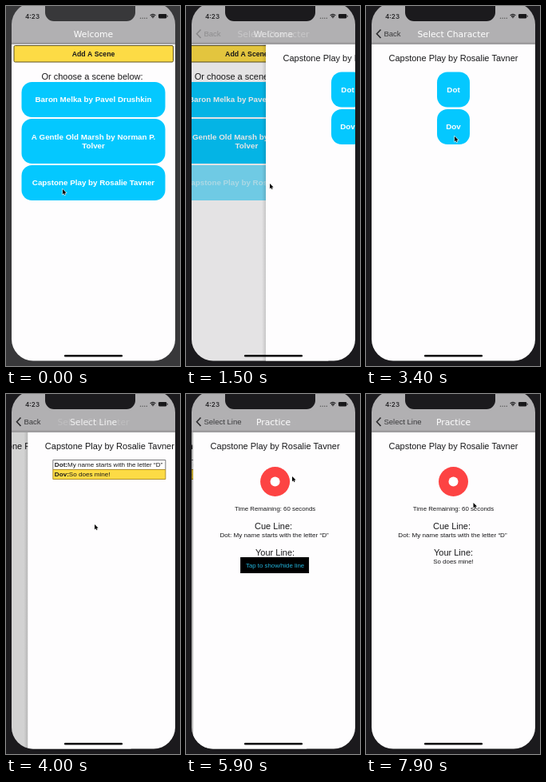
Animation, 218 px wide and 450 px high, one loop 8000 ms. Source, as an HTML page with a canvas:

```html
<!DOCTYPE html>
<html lang="en">
<head>
<meta charset="utf-8">
<title>Scene practice app</title>
<style>
  html, body { margin: 0; width: 100%; height: 100%; overflow: hidden; background: #1b1a1d; }
  canvas { display: block; }
</style>
</head>
<body>
<canvas id="stage" width="218" height="450"></canvas>
<script>
const g = document.getElementById('stage').getContext('2d');
const LOOP = 8000, STEP = 100, MID = 109.5;
const LEFT = 7, WIDTH = 205, BOTTOM = 444;
const SANS = '"Liberation Sans", Arial, sans-serif';
const VERDANA = '"DejaVu Sans", Verdana, sans-serif';
const BLUE = '#04c8ff', YELLOW = '#fddb45', INK = '#18181a';
const PLAY = 'Capstone Play by Rosalie Tavner';
const CUE = 'My name starts with the letter “D”', REPLY = 'So does mine!';

// Screen changes: start time of each push, and the release of each tap
const PUSHES = [1415, 3805, 5555], PUSH_TIME = 500;
const TAP_PLAY = 1400, TAP_ROLE = 3790, TAP_LINE = 5540, TAP_SHOW = 7050;
const TITLES = ['Welcome', 'Select Character', 'Select Line', 'Practice'];
const BACKS = ['', 'Back', 'Back', 'Select Line'];

// Pointer path: time, x, y
const PATH = [
  [0, 71, 229], [300, 73, 237], [600, 85, 249], [1000, 103, 229], [1300, 105, 222],
  [1900, 105, 222], [2300, 117, 191], [2700, 127, 123], [3000, 121, 139], [3300, 111, 163],
  [4500, 111, 163], [4800, 136, 113], [4900, 137, 107], [5300, 133, 103], [6400, 133, 103],
  [6800, 109, 209], [7000, 101, 212], [7400, 98, 208], [7600, 119, 151], [7700, 129, 99],
  [7800, 142, 115], [7900, 134.5, 136]
];

const clamp = v => Math.max(0, Math.min(1, v));
const mix = (a, b, k) => a + (b - a) * k;

// Cubic bezier (.2833, .99, .31833, .99)
function ease(x) {
  if (x <= 0 || x >= 1) return clamp(x);
  const curve = (s, a, b) => 3 * a * s * (1 - s) ** 2 + 3 * b * s * s * (1 - s) + s ** 3;
  let lo = 0, hi = 1;
  for (let i = 0; i < 24; i++) {
    const m = (lo + hi) / 2;
    if (curve(m, .2833, .31833) < x) lo = m; else hi = m;
  }
  return curve(lo, .99, .99);
}

// Opacity of a touchable released at the given time
function touch(t, release) {
  return t < release
    ? mix(1, .2, clamp((t - release + 200) / 150))
    : mix(.2, 1, clamp((t - release) / 250));
}

function faded(alpha, draw) {
  g.save();
  g.globalAlpha *= alpha;
  draw();
  g.restore();
}

function text(str, x, y, size, { color = INK, weight = 400, align = 'center', family = SANS } = {}) {
  g.font = `${weight} ${size}px ${family}`;
  g.textAlign = align;
  g.fillStyle = color;
  g.fillText(str, x, y);
}

function box(x, y, w, h, r, color) {
  g.fillStyle = color;
  g.beginPath();
  g.roundRect(x, y, w, h, r);
  g.fill();
}

function disc(x, y, r, color) {
  g.fillStyle = color;
  g.beginPath();
  g.arc(x, y, r, 0, 7);
  g.fill();
}

function framed(x, y, w, h, r, fill, line) {
  box(x + .5, y + .5, w - 1, h - 1, r, fill);
  g.strokeStyle = line;
  g.lineWidth = 1;
  g.stroke();
}

function pill(x, y, w, h, lines, alpha = 1) {
  faded(alpha, () => {
    box(x, y, w, h, 13, BLUE);
    lines.forEach((s, i) =>
      text(s, MID, y + h / 2 + 3.3 + (i - (lines.length - 1) / 2) * 11.4, 9.8, { color: '#fff', weight: 700 }));
  });
}

function row(y, who, line, fill, edge, alpha = 1) {
  faded(alpha, () => {
    framed(38, y, 142, 13, 0, fill, edge);
    text(who, 40.5, y + 9, 8.1, { weight: 700, align: 'left' });
    const w = g.measureText(who).width;
    text(line, 40.5 + w, y + 9, 8.1, { align: 'left' });
  });
}

const heading = () => text(PLAY, MID, 69, 11);

const screens = [
  t => {
    framed(9.5, 49, 200.5, 21.5, 1.5, YELLOW, '#5e5220');
    text('Add A Scene', MID, 62.5, 8.7, { weight: 700 });
    text('Or choose a scene below:', 108, 92, 11);
    pill(19.5, 95, 180, 44, ['Baron Melka by Pavel Drushkin']);
    pill(19.5, 141, 180, 56, ['A Gentle Old Marsh by Norman P.', 'Tolver']);
    pill(19.5, 199, 180, 44, [PLAY], touch(t, TAP_PLAY));
  },
  t => {
    heading();
    pill(89, 82.5, 41, 44, ['Dot']);
    pill(89, 129, 41, 44, ['Dov'], touch(t, TAP_ROLE));
  },
  t => {
    heading();
    row(82, 'Dot:', CUE, '#fff', '#77777a');
    row(94, 'Dov:', REPLY, YELLOW, '#b0902c', touch(t, TAP_LINE));
  },
  t => {
    heading();
    disc(MID, 109.5, 18.5, '#fd4343');
    disc(MID, 109.5, 6, '#fff');
    text('Time Remaining: 60 seconds', MID, 145.5, 7.85);
    text('Cue Line:', 107.5, 168.5, 11);
    text('Dot: ' + CUE, 108.5, 178.5, 8.1);
    text('Your Line:', MID, 201.5, 11);
    if (t < TAP_SHOW) {
      faded(touch(t, TAP_SHOW), () => {
        box(66, 204, 86, 20, 0, '#000');
        text('Tap to show/hide line', MID, 216.5, 7.85, { color: '#22b4dc' });
      });
    } else {
      text(REPLY, MID, 211.5, 7.9);
    }
  }
];

function card(i, t, dx, dim) {
  g.save();
  g.translate(dx, 0);
  if (dx > 0) {
    const shade = g.createLinearGradient(LEFT - 5, 0, LEFT, 0);
    shade.addColorStop(0, 'rgba(0,0,0,0)');
    shade.addColorStop(1, 'rgba(0,0,0,.13)');
    g.fillStyle = shade;
    g.fillRect(LEFT - 5, 48, 5, 400);
  }
  g.fillStyle = '#fefdfe';
  g.fillRect(LEFT, 48, WIDTH, 400);
  screens[i](t);
  g.restore();
  g.fillStyle = `rgba(0,0,0,${dim})`;
  g.fillRect(LEFT, 48, WIDTH, 400);
}

function backButton(label) {
  if (!label) return;
  g.strokeStyle = '#2c2c2e';
  g.lineWidth = 1.6;
  g.beginPath();
  g.moveTo(18.5, 29.5);
  g.lineTo(13.5, 34.8);
  g.lineTo(18.5, 40);
  g.stroke();
  text(label, 22.5, 38, 9.5, { color: '#38383a', align: 'left' });
}

function header(from, to, p) {
  g.fillStyle = '#b1b0b2';
  g.fillRect(LEFT, 0, WIDTH, 48);
  g.fillStyle = '#9d9c9e';
  g.fillRect(LEFT, 45.5, WIDTH, 2.5);

  const title = s => text(s, MID, 39, 10.8, { color: '#fff', family: VERDANA });
  const shown = p * p;
  faded(1 - shown, () => title(TITLES[from]));
  faded(shown, () => title(TITLES[to]));
  if (BACKS[from] === BACKS[to]) {
    backButton(BACKS[to]);
  } else {
    faded(1 - shown, () => backButton(BACKS[from]));
    faded(shown, () => backButton(BACKS[to]));
  }
}

function statusBar(bezel) {
  box(49, -15, 113, 34, 11, bezel);
  text('4:23', 24, 16, 8.2, { weight: 500, align: 'left', family: 'Inter, sans-serif' });
  for (let i = 0; i < 4; i++) disc(168.5 + i * 2.6, 15.3, .7, '#555');
  g.strokeStyle = INK;
  g.lineWidth = 1.3;
  for (const r of [1, 3, 5]) {
    g.beginPath();
    g.arc(184, 15.6, r, -2.3, -.84);
    g.stroke();
  }
  box(191, 10, 10.3, 5.4, 1.3, INK);
  box(201.8, 11.7, .9, 2, .4, INK);
}

function pointer(t) {
  let i = 0;
  while (i < PATH.length - 2 && PATH[i + 1][0] <= t) i++;
  const [t0, x0, y0] = PATH[i], [t1, x1, y1] = PATH[i + 1];
  const k = clamp((t - t0) / (t1 - t0));
  g.save();
  g.translate(mix(x0, x1, k), mix(y0, y1, k));
  g.scale(.8, .8);
  g.beginPath();
  [[0, 0], [0, 8], [1.9, 6.3], [3.1, 9], [4.4, 8.4], [3.2, 5.8], [5.7, 5.7]].forEach(([x, y]) => g.lineTo(x, y));
  g.closePath();
  g.strokeStyle = '#fff';
  g.lineWidth = 1.3;
  g.stroke();
  g.fillStyle = '#000';
  g.fill();
  g.restore();
}

function draw(t) {
  const bezel = t < 1000 ? '#38383a' : '#1b1a1d';
  g.fillStyle = bezel;
  g.fillRect(0, 0, 218, 450);

  const to = PUSHES.filter(s => t >= s).length;
  const from = Math.max(0, to - 1);
  const p = to ? ease((t - PUSHES[from]) / PUSH_TIME) : 1;

  g.save();
  g.beginPath();
  g.roundRect(LEFT, -4, WIDTH, BOTTOM + 3.5, 27);
  g.clip();
  if (p < 1) card(from, t, -.3 * WIDTH * p, .19 * p);
  card(to, t, WIDTH * (1 - p), 0);
  header(from, to, p);
  statusBar(bezel);
  box(73, 436, 73, 2.6, 1.3, '#000');
  g.restore();
  pointer(t);
}

function tick(now) {
  draw(Math.floor(now % LOOP / STEP) * STEP);
  requestAnimationFrame(tick);
}
draw(0);
requestAnimationFrame(tick);
</script>
</body>
</html>
```
